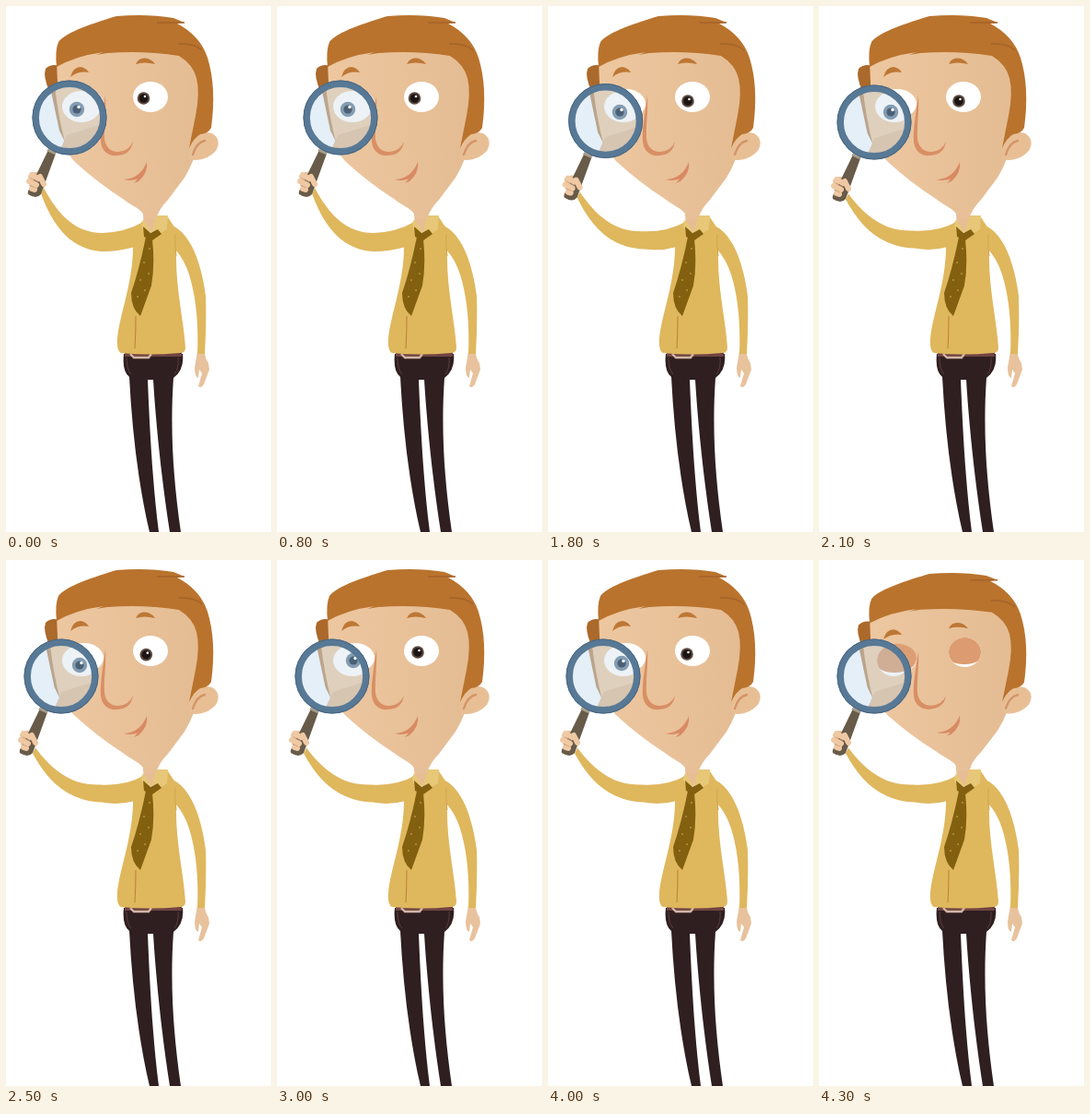
Animation of 288 by 570 pixels, one loop 4.4 s. Source, as an HTML page:

```html
<!DOCTYPE html>
<html lang="en">
<head>
<meta charset="utf-8">
<title>Man with a magnifying glass</title>
<style>
html, body { margin: 0; width: 100%; height: 100%; overflow: hidden; background: #fff; }
svg { display: block; width: 288px; height: 570px; }
</style>
</head>
<body>
<svg viewBox="0 0 288 570" fill="none">
  <defs>
    <linearGradient id="skin"><stop stop-color="#edc7a0"/><stop offset="1" stop-color="#e4bc93"/></linearGradient>
    <clipPath id="lensClip"><circle cx="69" cy="121" r="35"/></clipPath>
    <clipPath id="rightClip"><ellipse id="rightMask" cy="98.5" ry="16.5"/></clipPath>
    <clipPath id="leftClip"><ellipse id="leftMask" cy="109" ry="17"/></clipPath>
  </defs>

  <!-- legs and belt -->
  <path fill="#2f1f21" d="M128 377H192Q194 394 182 403C178 460 182 515 190 570H178C170 520 163 455 160 405H154C156 455 159 515 166 570H156C144 520 137 460 134 402Q126 396 128 377Z"/>
  <path fill="#6f4442" d="M129 375H191V380H129Z"/>
  <path stroke="#5c3d3a" d="M131 381Q131 394 136 399M187 381Q188 393 183 399"/>
  <path stroke="#d3b5a6" stroke-width="2.4" d="M135 377L139 381H155L158 377"/>

  <!-- neck, far arm, shirt -->
  <path fill="#e6bd94" d="M148 214H168L163 230L159 246L150 238Z"/>
  <path fill="#e8c29c" d="M208 374L216 375Q216 381 220 387L221 394L215 410Q212 415 209 412L213 398L210 394L209 403Q205 402 205 392Z"/>
  <path fill="#dfb75d" d="M181 238C200 247 212 276 217 314Q218 344 216 377H208Q210 326 199 291Q194 275 184 264Z"/>
  <path id="sleeve" fill="#dfb75d"/>
  <path fill="#dfb75d" d="M148 233L158 247L176 229L184 241L185 266C184 305 193 339 195 370Q195 376 189 376Q155 379 125 376Q120 374 121 360C124 332 138 300 138 261Z"/>
  <path stroke="#cfa650" d="M184 247Q183 258 185 271"/>
  <path fill="#e7c878" d="M163 227H176L175 242L167 247L159 244ZM149 231L158 244L151 248L147 238Z"/>
  <path stroke="#b98138" d="M141 336Q141 355 140 371"/>
  <g fill="#83600f">
    <path d="M149 239L157 246L165 242L169 247L159 254L150 250Z"/>
    <path d="M152 250L159 253Q162 280 158 303L146 336Q136 328 136 311Q145 285 152 250Z"/>
    <path fill="#a98632" d="M155 262h2v2h-2zM149 277h2v2h-2zM154 289h2v2h-2zM145 296h2v2h-2zM150 307h2v2h-2zM142 314h2v2h-2z"/>
  </g>

  <g id="head">
    <path fill="#ab692b" d="M47 92Q40 76 43 68Q49 62 58 65L60 90Z"/>
    <path fill="url(#skin)" d="M55 58Q120 22 195 36Q216 64 211 140Q206 167 194 186L176 210Q166 220 163 231H150C151 221 140 219 127 209Q99 191 75 169C60 155 57 116 55 58Z"/>
    <path fill="#e8bf95" d="M201 145Q211 134 224 138Q235 145 228 157Q216 170 199 166Z"/>
    <path stroke="#d39468" stroke-width="2.5" stroke-linecap="round" d="M203 161Q207 148 216 146"/>
    <path fill="#b9732d" d="M55 66Q53 48 57 39C65 28 97 18 120 11Q153 8 182 13L194 18L186 19Q211 32 219 56Q229 88 223 132Q220 138 211 139Q204 143 199 154Q202 139 206 119Q211 94 207 78Q203 63 188 54Q150 48 110 51L98 53L106 50Q76 54 55 66Z"/>
    <path stroke="#a5632a" stroke-width="1.5" d="M164 18Q181 18 194 18M187 41Q205 40 213 48"/>
    <path id="rightBrow" fill="#bd7734" d="M141 63Q144 56 151 56.5Q158 57 162 63Q150 60 141 63Z"/>
    <path id="leftBrow" fill="#bd7734" d="M70 77Q73 66 81 66Q87 67 90 72Q79 70 70 77Z"/>
    <ellipse cx="85" cy="106" rx="21" ry="16" fill="#fff"/>
    <ellipse id="leftCover" cx="85" cy="105" rx="21" ry="16" fill="#dd9e74"/>
    <path fill="#d98f64" d="M108 97C105 118 102 135 103 147C104 158 112 163 121 162Q136 161 138 147Q134 157 122 158C113 158 108 152 107 144C106 130 109 115 108 97Z"/>
    <path fill="#d98a62" d="M128 188Q146 187 153 169Q155 180 144 190L139 192L143 187.5Q135 190 128 188Z"/>
    <g clip-path="url(#rightClip)">
      <path fill="#fff" d="M130 78h50v40h-50z"/>
      <g id="rightPupil">
        <circle r="6.8" fill="#5b4a42"/><circle r="4.8" fill="#1b1412"/><circle cx="1.5" cy="-2" r="1.3" fill="#fff"/>
      </g>
      <ellipse id="rightLid" cx="158" rx="25" ry="18" fill="#dc9b70"/>
    </g>
  </g>

  <g id="glass">
    <path fill="#e8bf98" d="M24 184Q30 177 39 182L44 193L37 202L27 199Z"/>
    <path fill="#685b49" d="M46 156L54 160L38 204Q33 210 24 204Q23 201 26 197Z"/>
    <path stroke="#a99c87" stroke-width="3" d="M45 156L54 160"/>
    <path stroke="#efc9a4" stroke-width="6" stroke-linecap="round" d="M28 183L35 187M25 190L33 194M28 198L31 199"/>
    <path stroke="#cf9a70" stroke-width=".8" d="M27 187L35 191M25 194L32 197"/>
    <path stroke="#efc9a4" stroke-width="6" stroke-linecap="round" d="M37 185L41 193"/>
    <g clip-path="url(#lensClip)">
      <path fill="#e4eff8" d="M30 80h80v82h-80z"/>
      <g id="view">
        <path fill="#dfd0bd" d="M47 82H110V162H56L64 148Z"/>
        <path fill="#d6c5b1" d="M66 140L110 126V162H56Z"/>
        <path fill="#bba58c" d="M48 88L53 87Q57 121 64 147L58 135Z"/>
      </g>
      <g id="leftEye">
        <g clip-path="url(#leftClip)">
          <path fill="#edf2f6" d="M55 88h55v42h-55z"/>
          <g id="leftPupil">
            <circle r="8.2" fill="#839cb2"/><circle r="4.6" fill="#4b6074"/><circle cx="2" cy="-2.5" r="1.7" fill="#fff"/>
          </g>
          <ellipse id="leftLid" cx="82" rx="26" ry="18" fill="#d0ae95"/>
        </g>
      </g>
    </g>
    <circle cx="69" cy="121" r="36.8" stroke="#587996" stroke-width="7.4"/>
    <circle cx="69" cy="121" r="40" stroke="#48657f"/>
  </g>
</svg>
<script>
const LOOP = 4400, STEP = 100;
const el = id => document.getElementById(id);
const set = (id, attrs) => { for (const k in attrs) el(id).setAttribute(k, attrs[k]); };
const move = (id, x, y) => set(id, { transform: `translate(${x} ${y})` });
const mix = (a, b, k) => a + (b - a) * k;
const ramp = (t, from, to) => Math.min(1, Math.max(0, (t - from) / (to - from)));

// time, right pupil x y, left pupil x y (as seen through the lens)
const gaze = [
  [0, 149.5, 100, 77, 112],
  [900, 149.5, 100, 77, 112],
  [1500, 152, 103, 78, 115],
  [2100, 152, 103, 78, 115],
  [2700, 152.5, 102.5, 81, 113.5],
  [3000, 153, 100, 83, 109],
  [3400, 153, 100, 83, 109],
  [4000, 151, 102, 80, 112],
  [LOOP, 151, 102, 80, 112]
];

function look(t) {
  const i = gaze.findIndex(g => g[0] > t), a = gaze[i - 1], b = gaze[i];
  return a.map((v, j) => mix(v, b[j], ramp(t, a[0], b[0])));
}

function draw(t) {
  const [, rx, ry, lx, ly] = look(t);
  const slide = Math.sin(ramp(t, 1500, 2100) * Math.PI / 2);
  const blink = ramp(t, 4000, 4300);
  const dx = -9 * slide, dy = 5 * slide;

  move("glass", dx, dy);
  move("view", -dx * .4, -dy * .4);
  move("leftEye", -dx, -dy);
  move("rightPupil", rx, ry);
  move("leftPupil", lx, ly);
  set("sleeve", { d: `M${41 + dx} ${197 + dy * 1.3}
    C${57 + dx * .7} ${227 + dy * .3} ${76 + dx * .5} ${246 - dy * .3} ${105 + dx * .3} ${246 - dy * .5}
    Q130 245 149 234L140 261
    Q122 266 ${106 + dx * .2} ${266 - dy * .7}
    C${70 + dx * .5} ${265 - dy * .8} ${50 + dx * .6} ${237 + dy * .2} ${38 + dx} ${203 + dy * 1.3}Z` });

  const squash = 1 - .029 * blink;
  set("head", { transform: `translate(0 ${150 * (1 - squash)}) scale(1 ${squash})` });
  move("rightBrow", 0, 9 * blink);
  move("leftBrow", 0, 7 * blink);
  set("rightMask", { cx: mix(157, 158.5, blink), rx: mix(19, 17.5, blink) });
  set("leftMask", { cx: mix(82, 81, blink), rx: mix(21, 18, blink) });
  set("rightLid", { cy: mix(62, 94, blink) });
  set("leftLid", { cy: mix(72, 104, blink) });
  set("leftCover", { opacity: blink });
}

function tick(now) {
  draw(Math.floor(now % LOOP / STEP) * STEP);
  requestAnimationFrame(tick);
}
draw(0);
requestAnimationFrame(tick);
</script>
</body>
</html>
```
